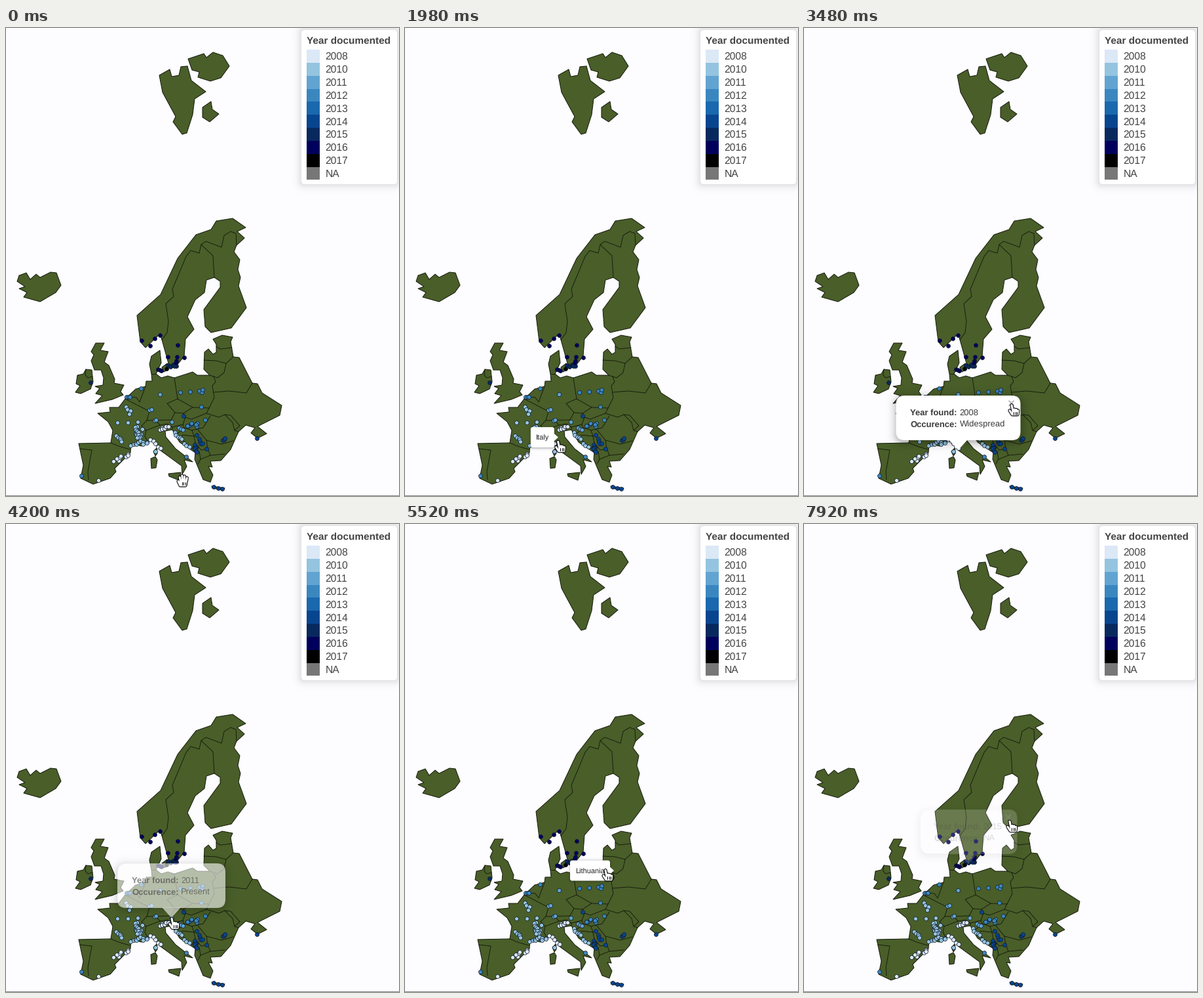
A matplotlib script for the animation above (7980 ms loop, 600 by 713 pixels).

```python
import numpy as np
import matplotlib.pyplot as plt
from matplotlib.animation import FuncAnimation
from matplotlib.patches import FancyBboxPatch, Polygon
from matplotlib.path import Path

W, H = 600, 713
STEP, FRAMES = 60, 133
FADE = 200
LAND, EDGE, INK = "#495e29", "#151a0c", "#3a3a3a"
YEARS = {
    "2008": "#dbe8f6", "2010": "#94c4df", "2011": "#62a4d1", "2012": "#3a87c0",
    "2013": "#1a68ae", "2014": "#08458f", "2015": "#08295e", "2016": "#00005c",
    "2017": "#000000", "NA": "#777777",
}

plt.rcParams.update({"font.family": "Liberation Sans", "text.hinting": "no_hinting"})
fig = plt.figure(figsize=(W / 72, H / 72), dpi=72, facecolor="#fdfcfe")
ax = fig.add_axes([0, 0, 1, 1])
ax.set_xlim(0, W)
ax.set_ylim(H, 0)
ax.axis("off")

# --- Map: coastlines first, borders on top ---
coasts = []


def land(*pts):
    coasts.append(Path(pts))
    ax.add_patch(Polygon(pts, fc=LAND, ec=EDGE, lw=1, joinstyle="round", zorder=1))


def border(*pts):
    ax.plot(*zip(*pts), color=EDGE, lw=0.9, solid_joinstyle="round", zorder=2)


# Svalbard and Iceland
land((234, 72), (250, 63), (253, 74), (264, 72), (267, 59), (277, 58), (283, 80), (305, 97),
     (288, 108), (285, 132), (276, 160), (269, 162), (255, 143), (259, 135), (239, 98))
land((278, 47), (302, 39), (306, 45), (316, 37), (331, 42), (341, 58), (328, 76), (312, 81),
     (293, 75), (295, 67), (284, 64))
land((300, 121), (313, 112), (315, 124), (325, 131), (311, 143), (300, 136))
land((17, 386), (20, 377), (31, 373), (37, 383), (46, 375), (52, 380), (68, 372), (77, 373),
     (84, 392), (76, 403), (52, 417), (27, 410), (32, 403), (20, 397), (29, 394))

# Scandinavia
land((200, 438), (236, 406), (262, 351), (290, 315), (313, 307), (321, 294), (346, 290), (366, 304),
     (353, 310), (364, 320), (352, 331), (348, 341), (357, 353), (354, 368), (358, 380), (355, 393),
     (367, 426), (344, 457), (313, 464), (304, 455), (302, 429), (327, 395), (327, 386), (318, 380),
     (306, 384), (303, 403), (289, 414), (277, 440), (287, 459), (274, 474), (272, 500), (260, 515),
     (250, 518), (238, 475), (235, 466), (213, 487), (205, 478))
border((352, 331), (351, 313), (343, 310), (333, 316), (329, 334), (305, 325), (298, 330), (316, 347),
       (318, 380))
border((298, 330), (295, 343), (282, 339), (275, 348), (254, 398), (256, 409), (244, 420), (248, 447),
       (246, 464), (238, 475))
land((238, 517), (246, 511), (248, 520), (241, 524))

# British Isles and southern islands
land((137, 480), (150, 480), (144, 491), (156, 493), (150, 509), (157, 514), (166, 535), (165, 541),
     (180, 544), (175, 554), (179, 559), (162, 566), (136, 572), (147, 560), (137, 557), (143, 549),
     (136, 546), (148, 544), (149, 533), (145, 521), (135, 521), (130, 507), (134, 498), (130, 493))
land((106, 555), (113, 545), (107, 542), (109, 529), (118, 527), (122, 520), (131, 521), (133, 539),
     (129, 550), (114, 557))
border((122, 520), (121, 529), (125, 533), (132, 531))
land((225, 645), (230, 640), (231, 648), (228, 652))
land((221, 656), (228, 653), (231, 658), (229, 670), (222, 671))
land((248, 679), (267, 677), (264, 689), (249, 683))
land((314, 698), (334, 701), (332, 704), (315, 701))

# Mainland, Baltic to Greece and then Adriatic to Jutland
east = [(222, 527), (219, 512), (222, 500), (235, 491), (236, 501), (237, 510), (229, 527), (237, 533),
        (247, 530), (257, 533), (285, 524), (292, 529), (311, 529), (302, 520), (303, 494), (309, 489),
        (316, 497), (321, 494), (321, 482), (316, 474), (330, 468), (346, 471), (343, 478), (347, 501),
        (356, 502), (376, 541), (384, 542), (391, 556), (421, 575), (418, 590), (384, 607), (398, 618),
        (384, 625), (374, 617), (380, 609), (366, 605), (355, 615), (343, 642), (328, 659), (312, 660),
        (315, 669), (309, 668), (316, 681), (312, 692), (301, 688), (288, 657), (289, 647)]
west = [(265, 631), (257, 618), (254, 612), (243, 614), (244, 623), (259, 641), (285, 661), (272, 658),
        (276, 668), (269, 680), (268, 667), (235, 643), (226, 629), (216, 629), (207, 637), (191, 633),
        (190, 647), (166, 671), (168, 676), (159, 686), (133, 695), (114, 686), (118, 666), (111, 633),
        (160, 632), (163, 613), (156, 600), (140, 587), (159, 585), (158, 578), (172, 578), (182, 565),
        (198, 550), (213, 546), (214, 538), (223, 538)]
land(*east, *west)

border((222, 527), (229, 527))
border((321, 485), (327, 489), (345, 487))
border((302, 506), (321, 507), (336, 511), (347, 501))
border((336, 511), (333, 525), (323, 533), (311, 529))
border((317, 531), (320, 539), (315, 545), (318, 563), (310, 579))
border((317, 555), (340, 553), (367, 556), (376, 541))
border((257, 533), (262, 565), (285, 578), (310, 579), (306, 587), (325, 593), (334, 589), (346, 601),
       (349, 613), (355, 615))
border((334, 589), (343, 590), (357, 606), (349, 613))
border((262, 565), (246, 572), (258, 586), (271, 587), (285, 578))
border((258, 586), (252, 597), (215, 598), (219, 584), (182, 565))
border((190, 562), (199, 563), (204, 570), (213, 546))
border((215, 598), (207, 606), (214, 613), (235, 605), (247, 603), (254, 608), (254, 612))
border((214, 613), (212, 622), (216, 629))
border((229, 598), (235, 605))
border((271, 587), (274, 593), (270, 604), (254, 608))
border((274, 593), (283, 596), (306, 587))
border((270, 604), (272, 609), (284, 613), (301, 609), (312, 591))
border((272, 609), (263, 617), (257, 618))
border((284, 613), (287, 622), (269, 620), (268, 626), (284, 641), (289, 632), (287, 622))
border((292, 611), (306, 628), (329, 634), (347, 629))
border((306, 628), (308, 641), (298, 643), (289, 632))
border((308, 641), (312, 651), (334, 649))
border((312, 651), (297, 657), (293, 664))
border((297, 657), (295, 645), (289, 647))
border((113, 641), (131, 643), (125, 676), (126, 688))
border((160, 632), (172, 637), (189, 642))

# Countries around the pointer's route, by centre
CENTRES = {
    "Germany": (235, 565), "Switzerland": (222, 606), "Austria": (250, 600), "Italy": (236, 628),
    "Czech Republic": (266, 578), "Slovakia": (292, 586), "Hungary": (288, 604), "Poland": (290, 550),
    "Ukraine": (345, 575), "Lithuania": (318, 518), "Denmark": (228, 505), "Sweden": (262, 430),
}

# --- Sightings: runs of dots with a little scatter ---
rng = np.random.default_rng(4)


def run(year, n, start, end=None, spread=0.0):
    xy = np.linspace(start, end or start, n) + rng.normal(0, spread, (n, 2))
    ax.scatter(*xy.T, s=36, c=YEARS[year], edgecolors="#10182a", linewidths=0.7, zorder=3)


run("2008", 8, (165, 660), (189, 646), 2)
run("2008", 5, (222, 626), (235, 642), 1)
run("2008", 8, (235, 613), (247, 606), 1.2)
run("2008", 1, (141, 689))
run("2010", 4, (184, 578), (188, 587), 1.5)
run("2010", 3, (170, 601), (201, 600))
run("2010", 5, (168, 621), (177, 629), 1)
run("2010", 20, (202, 611), (202, 622), 3)
run("2010", 10, (192, 634), (214, 630), 1.5)
run("2010", 8, (256, 616), (279, 638), 1)
run("2010", 1, (228, 645))
run("2011", 1, (235, 558))
run("2011", 2, (219, 582), (222, 581))
run("2011", 2, (227, 598), (229, 597))
run("2011", 1, (253, 600))
run("2011", 3, (264, 609), (270, 612))
run("2012", 3, (184, 562), (189, 562))
run("2012", 1, (206, 549))
run("2012", 3, (266, 555), (295, 553))
run("2012", 2, (299, 555), (300, 551))
run("2012", 2, (298, 577), (304, 597))
run("2012", 8, (276, 606), (293, 602), 3)
run("2012", 1, (115, 682))
run("2012", 1, (275, 653))
run("2014", 1, (271, 591))
run("2014", 5, (293, 622), (300, 633), 1.5)
run("2014", 6, (287, 635), (291, 646), 1)
run("2014", 1, (306, 641))
run("2014", 3, (331, 628), (334, 625))
run("2014", 1, (383, 625))
run("2014", 3, (317, 699), (330, 702))
run("2015", 8, (246, 514), (258, 514), 2)
run("2015", 1, (129, 540))
run("2016", 2, (207, 476), (220, 484))
run("2016", 2, (227, 473), (235, 468))
run("2016", 1, (262, 483))
run("2016", 3, (248, 500), (271, 503), 1)
run("2016", 3, (232, 520), (237, 522))
run("2016", 2, (260, 507), (259, 510))
run("2017", 1, (245, 519))

ax.plot([0, W], [712.4, 712.4], color="#8f8f8f", lw=1.2, zorder=4)


# --- Boxes with soft shadows ---
MARGIN = 22


def shadow(w, h, r, sigma, dy, strength):
    """Drop shadow around a rounded box, cut out below the box itself."""
    y, x = np.mgrid[-MARGIN:h + MARGIN, -MARGIN:w + MARGIN] + 0.5

    def dist(shift):
        qx = abs(x - w / 2) - w / 2 + r
        qy = abs(y - shift - h / 2) - h / 2 + r
        return np.hypot(np.maximum(qx, 0), np.maximum(qy, 0)) + np.minimum(np.maximum(qx, qy), 0) - r

    rgba = np.zeros(x.shape + (4,))
    rgba[..., 3] = strength / (1 + np.exp(1.7 * dist(dy) / sigma)) * (dist(0) > -1)
    return rgba


def extent(x, y, w, h):
    return x - MARGIN, x + w + MARGIN, y + h + MARGIN, y - MARGIN


def panel(x, y, w, h, r, z, *shade):
    glow = ax.imshow(shadow(w, h, r, *shade), extent=extent(x, y, w, h), aspect="auto", zorder=z)
    style = f"round,pad=0,rounding_size={r}"
    face = FancyBboxPatch((x, y), w, h, boxstyle=style, fc="white", ec="none", zorder=z)
    return glow, ax.add_patch(face)


def label(x, y, s, size, z, **kw):
    return ax.text(x, y, s, fontsize=size, zorder=z, **{"color": INK, **kw})


def width(text):
    return text.get_window_extent().width


panel(451, 3, 146, 235, 5, 5, 7, 0, 0.22)
label(459, 25, "Year documented", 15.4, 6, weight="bold", color="#444444")
for i, (year, color) in enumerate(YEARS.items()):
    top = 33 + 19.85 * i
    ax.add_patch(plt.Rectangle((459.3, top), 19.85, 19.85, fc=color, ec="none", zorder=6))
    label(487.5, top + 15.2, year, 15.6, 6, color="#444444")


class Popup:
    def __init__(self, x, tip, year, status, opened, closed):
        self.anchor, self.opened, self.closed = (x, tip), opened, closed
        top = tip - 83
        rows, end = [], 0
        for i, (key, value) in enumerate([("Year found:", year), ("Occurence:", status)]):
            y = top + 29.5 + 18 * i
            head = label(0, y, key, 13, 8, weight="bold")
            body = label(width(head) + 3.6, y, value, 13, 8)
            end = max(end, body.get_position()[0] + width(body))
            rows += [head, body]
        w = int(round(end + 45))
        left = x - w / 2
        for text in rows:
            text.set_x(text.get_position()[0] + left + 22)
        self.rect = left, top, left + w, top + 68
        self.cross = left + w - 15, top + 13
        stem = [(x - 14, top + 67.5), (x + 14, top + 67.5), (x, tip)]
        self.parts = rows + [
            *panel(left, top, w, 68, 13, 7, 7, 3, 0.4),
            ax.add_patch(Polygon(stem, fc="white", ec="none", zorder=7)),
            label(*self.cross, "×", 19, 8, weight="bold", color="#bcbcbc", ha="center", va="center"),
        ]

    def alpha(self, t):
        return float(np.clip(min((t - self.opened) / FADE, 1 - (t - self.closed) / FADE), 0, 1))

    def covers(self, x, y):
        x0, y0, x1, y1 = self.rect
        return x0 < x < x1 and y0 < y < y1

    def draw(self, t):
        a = self.alpha(t)
        for part in self.parts:
            part.set_visible(a > 0)
            part.set_alpha(a)


popups = [
    Popup(235.5, 643, "2008", "Widespread", 2440, 3600),
    Popup(252.5, 600, "2011", "Present", 4080, 4980),
    Popup(251, 518, "2015", "NA", 6180, 7755),
]

# --- Tooltip that follows the pointer ---
TIP_H, TIP_SHADE = 31, (2, 1, 0.4)
tip_glow, tip_box = panel(0, 0, 60, TIP_H, 3, 6, *TIP_SHADE)
tip_arrow = ax.add_patch(Polygon([(0, 0)] * 3, fc="white", ec="none", zorder=6))
tip_text = label(0, 0, "", 11, 6.5, color="#222222", va="center_baseline")


def draw_tooltip(name, x, y):
    for part in (tip_glow, tip_box, tip_arrow, tip_text):
        part.set_visible(bool(name))
    if not name:
        return
    tip_text.set_text(name)
    w = int(round(width(tip_text))) + 16
    left, top = x - 6 - w, y - TIP_H / 2
    tip_text.set_position((left + 8, y + 0.5))
    tip_box.set_bounds(left, top, w, TIP_H)
    tip_glow.set_data(shadow(w, TIP_H, 3, *TIP_SHADE))
    tip_glow.set_extent(extent(left, top, w, TIP_H))
    tip_arrow.set_xy([(x - 6.5, y - 6), (x, y), (x - 6.5, y + 6)])


# --- Pointer: fingers are round strokes that meet at the wrist ---
GAP = (np.nan, np.nan)


def fan(tips, wrist_x, wrist_y):
    pts = []
    for i, tip in enumerate(tips):
        pts += [tip, (wrist_x + 2 * i, wrist_y), GAP]
    return np.array(pts)


def creases(x, y):
    return np.array([p for i in range(3) for p in ((x + 2.5 * i, y), (x + 2.5 * i, y + 4), GAP)])


SHAPES = {
    "point": (fan([(-3, 9.8), (0, 1.6), (4.2, 8), (6.9, 8.4), (9.7, 9.8)], 1, 16), creases(3.4, 11.5)),
    "grab": (fan([(-7, 0.5), (-4.8, -5.5), (-1.2, -8), (2.6, -7), (6.3, -4.5)], -4, 7), creases(-1.5, 1.5)),
    "text": (np.array([GAP]),
             np.array([(-3, -8), (3, -8), GAP, (0, -8), (0, 8), GAP, (-3, 8), (3, 8), GAP, (-2, 3), (2, 3)])),
}
outline, skin, lines = (
    ax.plot([], [], color=c, lw=lw, solid_capstyle="round", zorder=z)[0]
    for c, lw, z in [("black", 5.2, 10), ("white", 3.1, 11), ("black", 1, 12)])

# Resting places: arrive, leave, x, y
STOPS = [
    (0, 120, 270, 690), (1200, 1500, 235, 561), (2280, 2940, 233.5, 640.5), (3480, 3660, 317, 573),
    (4020, 4320, 253, 599.5), (4860, 5460, 319, 528), (6060, 6360, 250.5, 517),
    (6720, 6900, 277, 478), (7560, 7980, 314, 451.5),
]


def pointer(t):
    for (_, leave, *a), (arrive, _, *b) in zip(STOPS, STOPS[1:]):
        if t < arrive:
            u = max(0, (t - leave) / (arrive - leave))
            return np.array(a) + np.subtract(b, a) * u * (2 - u)
    return np.array(STOPS[-1][2:])


def hover(pos, t):
    """Pointer shape and country name under a position."""
    def away(p):
        return np.hypot(*np.subtract(pos, p))

    for p in popups:
        if p.alpha(t) > 0 and p.covers(*pos):
            return ("point" if away(p.cross) < 10 else "text"), ""
        if abs(t - p.opened) < 600 and away(p.anchor) < 4:
            return "point", ""
    if any(c.contains_point(pos) for c in coasts):
        return "point", min(CENTRES, key=lambda n: away(CENTRES[n]))
    return "grab", ""


def draw(i):
    t = i * STEP
    for p in popups:
        p.draw(t)
    # hover reacts one step late
    seen = pointer(t - STEP)
    kind, name = hover(seen, t)
    draw_tooltip(name, *seen)
    now = pointer(t)
    hand, marks = (shape + now for shape in SHAPES[kind])
    outline.set_data(*hand.T)
    skin.set_data(*hand.T)
    lines.set_data(*marks.T)


anim = FuncAnimation(fig, draw, frames=FRAMES, interval=STEP, repeat=True)
plt.show()
```
